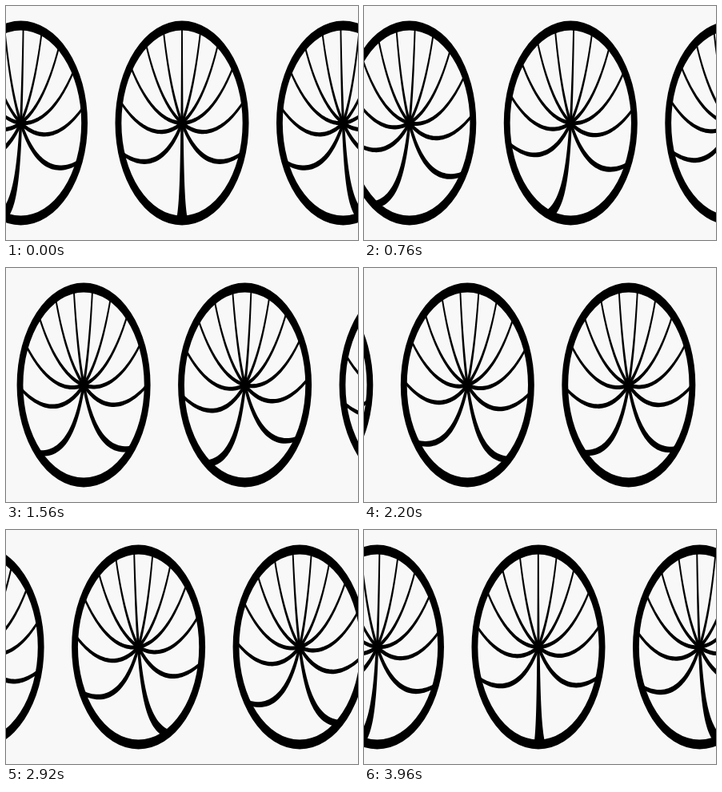
An HTML page with a canvas for the animation above (4 s loop, 440 px wide and 293 px high).

```html
<!DOCTYPE html>
<html lang="en">
<head>
<meta charset="utf-8">
<title>Relativistic rolling wheels</title>
<style>
  html, body { margin: 0; width: 100%; height: 100%; overflow: hidden; background: #f8f8f8; }
  canvas { display: block; width: 100%; height: 100%; }
</style>
</head>
<body>
<canvas id="stage"></canvas>
<script>
const WIDTH = 440, HEIGHT = 293;
const LOOP = 4000, STEP = 40;
const CENTER_X = 220, CENTER_Y = 146.5;
const SPACING = 201.5;          // distance between wheels, travelled once per loop
const RADIUS = 128, RIM = 12;
const SQUEEZE = 83.5 / RADIUS;  // horizontal contraction
const SKEW = 0.81;              // simultaneity shift at the outer rim
const SPOKES = 12, SPOKE_WIDTH = 5;
const TURN = 26 * Math.PI / 180; // rotation per loop
const TAU = 2 * Math.PI;

const canvas = document.getElementById('stage');
const ctx = canvas.getContext('2d');
const ratio = window.devicePixelRatio || 1;
canvas.width = Math.round(WIDTH * ratio);
canvas.height = Math.round(HEIGHT * ratio);

// Solves a - k sin(a) = angle, where a is the apparent angle.
function apparentAngle(angle, k) {
  const m = angle - TAU * Math.round(angle / TAU);
  let a = m + 0.85 * k * Math.sign(m);
  for (let i = 0; i < 7; i++) {
    a -= (a - k * Math.sin(a) - m) / (1 - k * Math.cos(a));
  }
  return a;
}

// Maps a point of the resting spoke; angles run clockwise from straight down.
function spokePoint(angle, along, across) {
  const r = Math.hypot(along, across);
  const a = apparentAngle(angle + Math.atan2(across, along), SKEW * r / RADIUS);
  return [-r * Math.sin(a) * SQUEEZE, r * Math.cos(a)];
}

function drawSpoke(angle) {
  const end = RADIUS - RIM / 2, pieces = 40, half = SPOKE_WIDTH / 2;
  ctx.beginPath();
  for (let i = 0; i <= pieces; i++) ctx.lineTo(...spokePoint(angle, end * i / pieces, half));
  for (let i = pieces; i >= 0; i--) ctx.lineTo(...spokePoint(angle, end * i / pieces, -half));
  ctx.fill();
}

function drawWheel(x, turn) {
  ctx.save();
  ctx.translate(x, CENTER_Y);
  for (let i = 0; i < SPOKES; i++) drawSpoke(turn + i * TAU / SPOKES);
  ctx.beginPath();
  ctx.ellipse(0, 0, RADIUS * SQUEEZE, RADIUS, 0, 0, TAU);
  ctx.ellipse(0, 0, (RADIUS - RIM) * SQUEEZE, RADIUS - RIM, 0, 0, TAU);
  ctx.fill('evenodd');
  ctx.restore();
}

function draw(time) {
  const progress = Math.floor((time % LOOP) / STEP) * STEP / LOOP;
  ctx.setTransform(canvas.width / WIDTH, 0, 0, canvas.height / HEIGHT, 0, 0);
  ctx.fillStyle = '#f8f8f8';
  ctx.fillRect(0, 0, WIDTH, HEIGHT);
  ctx.fillStyle = '#000';
  for (let i = -2; i <= 1; i++) {
    const distance = i + progress;
    drawWheel(CENTER_X + SPACING * distance, TURN * distance);
  }
}

const start = performance.now();
function tick() {
  draw(performance.now() - start);
  requestAnimationFrame(tick);
}
tick();
</script>
</body>
</html>
```
